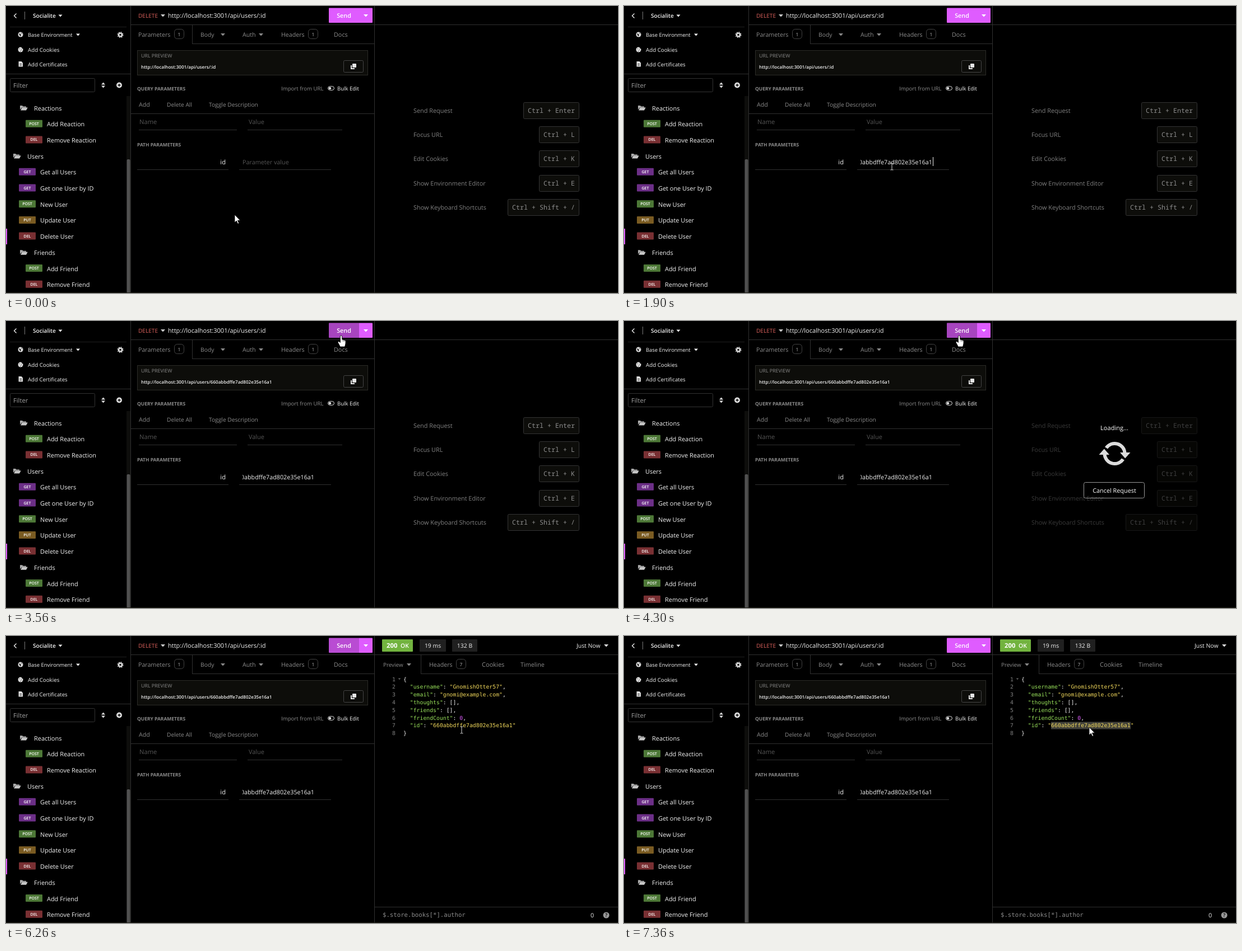
Recreate the animation shown at these times as an HTML page. Size 1092 by 513 pixels, loop 8000 ms.

```html
<!DOCTYPE html>
<html lang="en">
<head>
<meta charset="utf-8">
<title>Delete user request</title>
<style>
html, body { margin: 0; width: 100%; height: 100%; overflow: hidden; background: #000; }
svg { display: block; width: 1092px; height: 513px; }
text { font-family: "Open Sans", "Noto Sans", sans-serif; font-weight: 450; text-rendering: geometricPrecision; white-space: pre; }
.semi { font-weight: 600; }
.bold { font-weight: 700; }
.mono { font-family: "DejaVu Sans Mono", "Noto Sans Mono", monospace; }
.kbd { font-family: "Noto Sans Mono", "DejaVu Sans Mono", monospace; }
</style>
</head>
<body>
<svg id="stage" viewBox="0 0 1092 513"></svg>
<script>
const LOOP = 8000;
const USER_ID = "660abbdffe7ad802e35e16a1";
const BASE_URL = "http://localhost:3001/api/users/";
const PURPLE = "#df5cff", LINE = "#303030", GRAY = "#8b8b8b", DIM = "#555", WHITE = "#f2f2f2", PANEL = "#0d0d0a";

const text = (x, y, s, size = 10.95, fill = WHITE, attrs = "") =>
  `<text x="${x}" y="${y}" font-size="${size}" fill="${fill}" ${attrs}>${s}</text>`;
const rect = (x, y, w, h, fill, attrs = "") =>
  `<rect x="${x}" y="${y}" width="${w}" height="${h}" fill="${fill}" ${attrs}/>`;
const frame = (x, y, w, h, stroke = "#3c3c3c", r = 2, fill = "none") =>
  rect(x + .5, y + .5, w - 1, h - 1, fill, `rx="${r}" stroke="${stroke}"`);
const hline = (x1, x2, y, color = LINE) => rect(x1, y, x2 - x1, 1, color);
const vline = (x, y1, y2, color = LINE) => rect(x, y1, 1, y2 - y1, color);
const path = (d, fill, attrs = "") => `<path d="${d}" fill="${fill}" ${attrs}/>`;
const caret = (x, y, fill = WHITE, w = 4) => path(`M${x - w} ${y - 2}h${2 * w}l${-w} ${w + .5}z`, fill);
const group = (id, body, attrs = "") => `<g id="${id}" ${attrs}>${body}</g>`;
const semi = ' class="semi"', bold = ' class="bold"', middle = ' text-anchor="middle"', end = ' text-anchor="end"';
const count = (x, n) => frame(x, 41, 18, 18, "#444", 5) + text(x + 9, 53.5, n, 8.5, "#bbb", middle);

const folder = (x, y) =>
  path(`M${x} ${y + 3}v-7h4l1.5 1.5h5.5v2h-7.5z`, "#aaa") +
  path(`M${x + 1} ${y + 4.5}l2.7-5h10l-2.7 5z`, "#c8c8c8");

const BADGES = { POST: "#4d7837", DEL: "#793033", GET: "#6c2f87", PUT: "#7a5b22" };
const ROWS = [
  ["", "Reactions", 1], ["POST", "Add Reaction", 1], ["DEL", "Remove Reaction", 1],
  ["", "Users", 0], ["GET", "Get all Users", 0], ["GET", "Get one User by ID", 0],
  ["POST", "New User", 0], ["PUT", "Update User", 0], ["DEL", "Delete User", 0],
  ["", "Friends", 1], ["POST", "Add Friend", 1], ["DEL", "Remove Friend", 1]
];

function sidebarRow([method, label, depth], i) {
  const y = 182 + i * 28.7, x = 12 * depth;
  if (!method) return folder(13 + x, y) + text(38 + x, y + 4.5, label);
  return rect(23 + x, y - 7, 30, 13, BADGES[method], 'rx="1"') +
    text(38 + x, y + 2, method, 7, "#fff", middle + semi) +
    text(61 + x, y + 4.5, label);
}

function sidebar() {
  return path("M18.5 13.5l-4 4 4 4", "none", `stroke="${WHITE}" stroke-width="1.3"`) +
    vline(33, 10, 24, "#777") + text(48, 20.5, "Socialite", 10.1, WHITE, semi) + caret(97, 17.5, WHITE, 3.5) +
    hline(7, 215, 37, "#202020") +
    `<circle cx="26" cy="51" r="4.5" fill="#ddd"/>` + path("M23 49l3 1 1 3-2 1zM27 47l2 2-1 1z", "#222") +
    text(39, 55, "Base Environment", 9.4) + caret(128.5, 51.5, WHITE, 3.5) +
    `<circle cx="204" cy="51.5" r="2.9" fill="none" stroke="#ddd" stroke-width="2.4"/>
     <circle cx="204" cy="51.5" r="4.7" fill="none" stroke="#ddd" stroke-width="1.6" stroke-dasharray="1.9 1.79"/>` +
    `<circle cx="26" cy="78" r="4.5" fill="#ddd"/>` +
    path("M24 76h1v1h-1zM27 78h1v1h-1zM25 80h1v1h-1zM28 74h2v2h-2z", "#111") +
    text(39, 82, "Add Cookies", 9.75) +
    path("M22.5 99h5l2.5 2.5v7h-7.5z", "#ddd") + path("M24.5 103h3.5v1h-3.5zM24.5 105.5h3.5v1h-3.5z", "#333") +
    text(39, 108, "Add Certificates", 9.65) +
    hline(0, 222, 121) +
    frame(7, 129, 152, 25, "#333") + text(13, 146, "Filter", 11.2, "#a0a0a0") +
    path("M170 140.5h7l-3.5-4zM170 142.5h7l-3.5 4z", "#ddd") +
    `<circle cx="202" cy="141.5" r="5" fill="#ddd"/>` + path("M199.5 141.5h5M202 139v5", "none", 'stroke="#000" stroke-width="1.3"') +
    rect(215, 161, 7, 352, "#0e0e0c") + rect(215.5, 274, 6, 239, "#505050", 'rx="2"') +
    rect(0, 398, 2, 28, PURPLE) + ROWS.map(sidebarRow).join("") + vline(222, 0, 513);
}

function requestPane() {
  return text(236, 20.5, "DELETE", 10.1, "#d9605b") + caret(280, 17, "#ccc") +
    text(289, 20.5, BASE_URL + ":id", 11) +
    rect(576, 3.5, 78, 26.5, PURPLE, 'rx="1"') + rect(576, 3.5, 54, 26.5, "#000", 'id="shade"') +
    text(603, 21, "Send", 10.8, "#fff", middle + semi) + caret(642, 17, "#fff") +
    hline(222, 1092, 33) + hline(332, 658, 67) + vline(332, 34, 67) +
    text(236, 54.5, "Parameters", 10.65, GRAY) + count(300, 1) +
    text(347, 54.5, "Body", 10.3, GRAY) + caret(387, 51, GRAY) +
    text(422, 54.5, "Auth", 10.7, GRAY) + caret(455, 51, GRAY) +
    text(491, 54.5, "Headers", 10.65, GRAY) + count(539, 1) + text(585, 54.5, "Docs", 10.8, GRAY) +
    frame(234, 79, 412, 45, "#2b2b27", 0, PANEL) + text(241, 91.5, "URL PREVIEW", 8.85, GRAY) +
    text(241, 112, "", 8.1, WHITE, 'id="preview"' + semi) +
    frame(602, 97, 36, 22, "#444") + rect(618, 103, 7, 7, "#e6e6e6", 'rx="1"') +
    path("M617 106h-2v7h7v-2h-5z", "#e6e6e6") +
    text(234, 150.5, "QUERY PARAMETERS", 8.5, GRAY, bold) +
    text(491, 150.5, "Import from URL", 9.65, GRAY) +
    frame(574, 143, 12, 8, "#ddd", 4) + `<circle cx="578" cy="147" r="2.3" fill="#ddd"/>` +
    text(591, 150.5, "Bulk Edit", 9.55) +
    text(237, 179.5, "Add", 10.6, GRAY) + text(287, 179.5, "Delete All", 10.2, GRAY) +
    text(362, 179.5, "Toggle Description", 10.22, GRAY) + hline(222, 658, 192) +
    text(238, 211, "Name", 11.2, DIM) + hline(237, 412, 221) +
    text(433, 211, "Value", 10.9, DIM) + hline(431, 600, 221) +
    text(234, 250.5, "PATH PARAMETERS", 8.45, GRAY, bold) +
    text(392, 283, "id", 11.2, WHITE, end) + hline(234, 397, 292) + hline(416, 580, 292) +
    text(422, 283, "Parameter value", 10.8, DIM, 'id="hint"') +
    `<clipPath id="field"><rect x="422" y="265" width="158" height="26"/></clipPath>` +
    group("value", text(550, 283, USER_ID, 10.75, WHITE, end), 'clip-path="url(#field)"') +
    rect(422, 270, 1, 16, WHITE, 'id="caret"') + vline(657, 0, 513);
}

function shortcut([label, keys], i) {
  const y = 187 + i * 43.2, w = keys.length * 7 + 16;
  return text(727, y + 4, label, 10.9, "#808080") +
    frame(1023 - w, Math.round(y - 15), w, 30, "#343434", 2, PANEL) +
    text(1015, y + 4, keys, 11.67, "#8d8d8d", end + ' class="kbd"');
}
const SHORTCUTS = [
  ["Send Request", "Ctrl + Enter"], ["Focus URL", "Ctrl + L"], ["Edit Cookies", "Ctrl + K"],
  ["Show Environment Editor", "Ctrl + E"], ["Show Keyboard Shortcuts", "Ctrl + Shift + /"]
];

function loadingOverlay() {
  const arrow = path("M-15-10A18 18 0 0 1 18-1", "none", 'stroke="#dcdcdc" stroke-width="6"') +
    path("M9.5-2H28L18.7 8.5Z", "#dcdcdc");
  return rect(658, 34, 434, 479, "#000", 'opacity=".56"') +
    text(875, 195, "Loading...", 11.05, "#fff", middle) +
    group("spinner", arrow + `<g transform="rotate(180)">${arrow}</g>`) +
    frame(820, 288, 109, 29, "#999", 3) + text(875, 306.5, "Cancel Request", 10.85, "#fff", middle);
}

const span = (s, fill) => `<tspan fill="${fill}">${s}</tspan>`;
const entry = (key, value, color, comma = ",") =>
  "  " + span(`"${key}"`, "#98e05a") + ": " + span(value, color) + comma;
const YELLOW = "#f2d95c";
const JSON_LINES = [
  "{",
  entry("username", '"GnomishOtter57"', YELLOW),
  entry("email", '"gnomi@example.com"', YELLOW),
  entry("thoughts", "[]", WHITE),
  entry("friends", "[]", WHITE),
  entry("friendCount", "0", PURPLE),
  entry("id", `"${USER_ID}"`, YELLOW, ""),
  "}"
];

function responsePane() {
  const lines = JSON_LINES.map((s, i) => {
    const y = 80.5 + i * 13.83;
    return text(695, y, i + 1, 9.8, "#808080", end + ' class="mono"') +
      text(709, y, s, 9.8, WHITE, 'class="mono" xml:space="preserve"');
  }).join("");
  return rect(671, 6, 55, 22, "#72b33f", 'rx="1"') + text(679, 21, "200", 11.3, "#fff", bold) +
    text(704, 21, "OK", 10.4, "#fff", semi) +
    rect(738, 6, 47, 22, "#202020", 'rx="1"') + text(761.5, 20.5, "19 ms", 10.4, WHITE, middle) +
    rect(796, 6, 45, 22, "#202020", 'rx="1"') + text(818.5, 20.5, "132 B", 10.4, WHITE, middle) +
    text(1018, 20.5, "Just Now", 10.4) + caret(1071, 17, "#ddd") +
    vline(740, 34, 67) + hline(740, 1092, 67) +
    text(673, 54.5, "Preview", 9.9, GRAY) + caret(719, 51, GRAY) +
    text(755, 54.5, "Headers", 10.65, GRAY) + count(803, 7) +
    text(849, 54.5, "Cookies", 11.05, GRAY) + text(918, 54.5, "Timeline", 10.75, GRAY) +
    rect(762, 153.5, 142, 13, "#41413a", 'id="selection"') + lines + caret(702, 77.5, "#666", 2.3) +
    hline(658, 1092, 484) + text(672, 502, "$.store.books[*].author", 10.68, GRAY, 'class="mono"') +
    text(1043, 503, "0", 10.6) + `<circle cx="1071" cy="499" r="5.5" fill="#999"/>` +
    text(1071, 502.3, "?", 9, "#000", middle + semi);
}

const outline = 'stroke="#000" stroke-width=".8" stroke-linejoin="round"';
const POINTERS = {
  arrow: path("M0 0V14L3.3 11 5.6 16.3 7.7 15.4 5.4 10.2H9.8Z", "#fff", outline),
  beam: path("M-2.5-6H-.8L0-5.3.8-6H2.5M0-5.3V5.3M-2.5 6H-.8L0 5.3.8 6H2.5", "none", 'stroke="#ddd"'),
  hand: path("M-1.6.8Q0-1 1.6.8V6.8L6 8Q8 8.4 8 10.5V14Q7.5 17 6.5 20H-1.8Q-3.5 16-5.6 12.8Q-6.2 10.4-4 10.5L-1.6 12.5Z", "#fff", outline) +
    path("M3.2 7.5v3M5.4 8v3", "none", 'stroke="#000" stroke-width=".6"')
};

document.getElementById("stage").innerHTML = rect(0, 0, 1092, 513, "#000") + sidebar() + requestPane() +
  group("empty", SHORTCUTS.map(shortcut).join("")) +
  group("loading", loadingOverlay()) + group("response", responsePane()) +
  hline(0, 1092, 512, "#1d1d14") +
  group("pointer", Object.entries(POINTERS).map(([name, body]) => group(name, body)).join(""));

const el = id => document.getElementById(id);
const show = (id, on) => el(id).setAttribute("visibility", on ? "visible" : "hidden");
const ramp = (t, a, b) => Math.min(1, Math.max(0, (t - a) / (b - a)));
const ease = k => k * k * (3 - 2 * k);

const CLICK_FIELD = 900, PASTE = 1900, BLUR = 4000, LOAD = 4040, DONE = 4480, SELECT = 6680, SETTLE = 7360, BLINK = 530;
// start ms, end ms, target x, target y
const MOVES = [
  [30, 830, 478, 287], [2400, 2950, 601, 31], [3460, 3560, 598, 26],
  [6000, 6250, 813, 168], [6300, 6460, 829, 165]
];

function pointerAt(t) {
  let x = 408, y = 373;
  for (const [a, b, tx, ty] of MOVES) {
    const k = ease(ramp(t, a, b));
    x += (tx - x) * k;
    y += (ty - y) * k;
  }
  return t < SETTLE ? [x, y] : [830, 163];
}

function pointerKind(t, x, y) {
  const inside = (x1, y1, x2, y2) => x >= x1 && x <= x2 && y >= y1 && y <= y2;
  if (t >= SETTLE) return "arrow";
  if (inside(576, 4, 654, 32)) return "hand";
  const overText = inside(416, 265, 580, 293) || inside(431, 195, 600, 221) ||
    (t > DONE && inside(658, 68, 1092, 484));
  return overText ? "beam" : "arrow";
}

function caretOn(t) {
  if (t < CLICK_FIELD || t >= BLUR) return false;
  if (t < PASTE) return t < 1360;
  return Math.floor((t - PASTE) / BLINK) % 2 === 0;
}

function render(t) {
  const pasted = t >= PASTE, done = t >= DONE;
  const hover = ramp(t, 2960, 3160) - ramp(t, 6200, 6400);
  el("shade").setAttribute("opacity", .25 * hover);
  el("preview").textContent = BASE_URL + (t >= 2000 ? USER_ID : ":id");
  show("hint", !pasted);
  show("value", pasted);
  el("caret").setAttribute("x", pasted ? 551 : 422);
  show("caret", caretOn(t));

  show("empty", !done);
  show("loading", t >= LOAD && !done);
  el("loading").setAttribute("opacity", ramp(t, LOAD, LOAD + 200));
  el("spinner").setAttribute("transform", `translate(875.5 237) rotate(${(t - 4300) * .18})`);
  show("response", done);
  show("selection", t >= SELECT);

  const [x, y] = pointerAt(t), kind = pointerKind(t, x, y);
  el("pointer").setAttribute("transform", `translate(${x.toFixed(1)} ${y.toFixed(1)})`);
  for (const name in POINTERS) show(name, name === kind);
}

function tick() {
  render(performance.now() % LOOP);
  requestAnimationFrame(tick);
}
tick();
</script>
</body>
</html>
```
